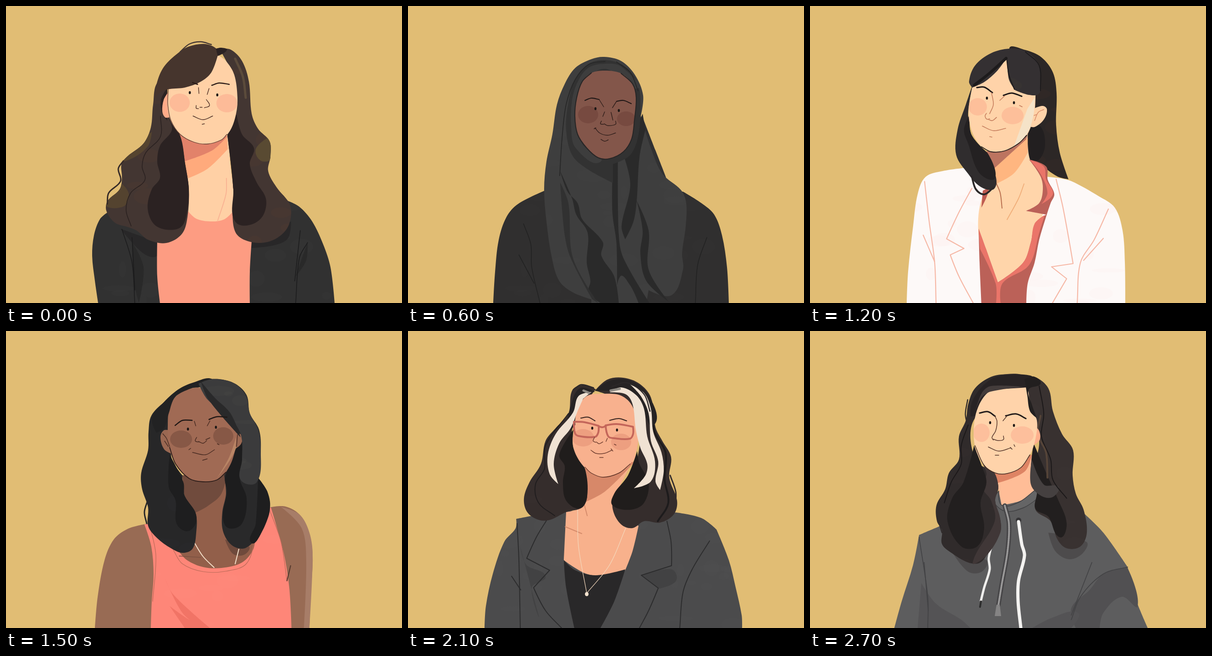
Animation of 864 by 648 pixels, one loop 3000 ms. Source, as an HTML page with a canvas:

```html
<!DOCTYPE html>
<html lang="en">
<head>
<meta charset="utf-8">
<title>Portraits</title>
<style>
html, body { margin: 0; width: 100%; height: 100%; overflow: hidden; background: #e1bd74; }
canvas { display: block; width: 100%; height: 100%; }
</style>
</head>
<body>
<canvas id="stage" width="864" height="648"></canvas>
<script>
const ctx = document.getElementById('stage').getContext('2d');
const HOLD = 300;

// Smooth curve through "x,y" points; "!" marks a corner.
function curve(text, closed) {
  const pts = text.split(' ').map(t => {
    const [x, y] = t.replace('!', '').split(',').map(Number);
    return { x, y, hard: t.endsWith('!') };
  });
  const n = pts.length;
  const at = i => closed ? pts[(i + n) % n] : pts[Math.max(0, Math.min(n - 1, i))];
  const handle = (i, len) => {
    const p = at(i), a = at(i - 1), b = at(i + 1);
    const k = p.hard ? 0 : len / 3 / (Math.hypot(b.x - a.x, b.y - a.y) || 1);
    return [p.x + (b.x - a.x) * k, p.y + (b.y - a.y) * k];
  };
  const path = new Path2D();
  path.moveTo(pts[0].x, pts[0].y);
  for (let i = 0; i < (closed ? n : n - 1); i++) {
    const p = at(i), q = at(i + 1), len = Math.hypot(q.x - p.x, q.y - p.y);
    path.bezierCurveTo(...handle(i, len), ...handle(i + 1, -len), q.x, q.y);
  }
  return path;
}

function shape(color, text) {
  const path = curve(text, true);
  ctx.fillStyle = color;
  ctx.fill(path);
  return path;
}

function lines(color, width, ...texts) {
  ctx.strokeStyle = color;
  ctx.lineWidth = width;
  for (const t of texts) ctx.stroke(curve(t, false));
}

function oval(color, x, y, rx, ry) {
  ctx.fillStyle = color;
  ctx.beginPath();
  ctx.ellipse(x, y, rx, ry, 0, 0, Math.PI * 2);
  ctx.fill();
}

function inside(path, draw) {
  ctx.save();
  ctx.clip(path);
  draw();
  ctx.restore();
}

function mottled(color, tint, text) {
  let seed = text.length;
  const rnd = () => (seed = seed * 16807 % 2147483647) / 2147483647;
  const path = shape(color, text);
  inside(path, () => {
    ctx.globalAlpha = 0.05;
    for (let i = 0; i < 70; i++) {
      oval(tint, 160 + rnd() * 570, 80 + rnd() * 570, 8 + rnd() * 30, 4 + rnd() * 14);
    }
  });
  return path;
}

function face(skin, blush, text, ...cheeks) {
  const path = shape(skin, text);
  inside(path, () => cheeks.forEach(c => oval(blush, ...c)));
  return path;
}

function eyes(x1, y1, x2, y2) {
  oval('#1d1816', x1, y1, 2.3, 3.2);
  oval('#1d1816', x2, y2, 2.3, 3.2);
}

function wavyBrunette() {
  mottled('#313131', '#55504e', '201,648! 194,600 188,545 192,500 205,465 222,450! 612,424! 640,438 668,470 692,520 708,570 717,648!');
  shape('#282728', '250,486! 330,515! 330,545 300,540');
  shape('#282728', '536,515! 622,470! 615,507 585,522 536,528!');
  shape('#292929', '275,515! 300,570 290,648! 279,600');
  shape('#292929', '658,515! 655,555 632,590!');
  lines('#1c1c1d', 1.6, '253,487 275,560 281,648', '275,505 278,560 281,620', '658,516 640,550 632,648', '642,490 630,600');
  shape('#fd9c82', '330,512! 395,440! 493,440! 536,512! 532,580 532,648! 336,648! 330,590');
  shape('#ffd0a5', '374,270! 484,265! 490,350 496,400 494,450! 475,466 446,470 415,464 395,445! 399,400');
  shape('#ffaa7c', '388,338! 397,376! 440,355 484,312! 482,280!');
  shape('#e2826a', '376,278! 389,339! 450,315 483,284!');
  lines('#f9b192', 1.8, '481,376 480,410 462,468');
  const left = mottled('#433632', '#8a4f35', '352,180! 356,240 380,285 391,345 399,400 396,460 384,497 350,517 310,510 285,490 265,482 238,473 219,447 222,425 248,400 253,375 252,345 265,328 300,300 316,265 321,215 332,165');
  const right = mottled('#433632', '#8a4f35', '466,94! 490,95 515,120 530,165 536,235 550,268 575,295 577,328 572,360 590,395 620,435 618,475 600,500 570,515 535,515 505,500 495,470 496,400 482,275! 500,240 503,190 490,140');
  inside(left, () => {
    shape('#55442f', '318,275! 309,307 262,338 240,330');
    shape('#54432f', '250,385! 268,410 255,438 215,430');
  });
  inside(right, () => shape('#594a32', '575,285! 583,330 557,338 545,312'));
  shape('#2b2222', '352,240! 380,283 391,345 399,400 395,450 382,482 350,488 322,475 309,440 318,400 336,375 330,340 336,305 362,270');
  shape('#2b2222', '482,274! 503,236! 515,280 541,310 532,345 547,385 567,420 562,455 540,475 508,477 494,455 496,400');
  lines('#2a2120', 1.6, '337,240 337,285 305,320 297,350 303,380 272,408 262,445 273,480');
  lines('#352a27', 3, '256,338 245,355 250,382 224,408 221,432');
  shape('#2b2423', '352,178! 338,205 341,235 352,250!');
  shape('#ffab88', '354,188! 344,205 341,230 347,243 356,243!');
  face('#ffd1a6', '#fdbb98', '355,178! 352,215 359,250 380,280 410,297 440,301 470,292 490,270 502,235 505,200 498,150 480,120 462,107! 380,165', [379, 211, 22, 20], [482, 212, 23, 20]);
  lines('#5d3b30', 1.3, '354,182 353,215 360,250 380,280 410,297 440,301 470,292 482,280');
  mottled('#46352d', '#a05a35', '462,108! 460,94 435,83 400,88 375,103 345,132 330,165 325,200! 340,186 358,181 390,178 425,165 448,145');
  shape('#2b2222', '458,93! 470,91 482,96 462,109!');
  lines('#433632', 2.5, '380,100 400,83 425,78 448,84');
  lines('#5b4b3b', 5, '500,115 517,155 523,200');
  lines('#2e1f1a', 2.4, '407,167 418,171', '449,173 465,168 487,171');
  lines('#4b2c23', 1.4, '420,178 421,191', '443,180 439,193', '415,217 415,223 420,224', '423,221 428,221', '433,222 444,217 437,204', '408,240 430,248 451,240', '428,258 433,257');
  eyes(401, 189, 461, 194);
}

function headscarf() {
  mottled('#302f2f', '#433c3a', '186,648! 190,580 198,510 215,460 240,432 300,402! 600,405! 640,430 668,455 685,500 696,570 700,648!');
  lines('#222', 1.6, '252,475 268,520 270,570 288,648', '242,543 275,605', '652,505 632,565 627,648');
  shape('#313132', '510,238! 540,315 563,374! 530,400!');
  mottled('#3e3e3e', '#555', '428,111 400,116 365,135 342,170 325,215 315,280 302,340 297,400 302,470 314,550 330,600 360,625 400,640! 400,648! 520,648! 525,620! 575,631 600,575 598,540 606,480 607,430 596,402 555,366 530,310 508,240! 513,195 495,150 465,120');
  const dark = '#2a2a2a';
  shape(dark, '332,360! 358,420 367,455 392,495 390,560 398,600 394,625 420,648! 460,648! 450,590 422,545 425,515 380,465 370,430 348,405');
  shape('#313131', '332,385! 342,500 355,550 402,640! 415,648! 360,550 350,430');
  shape(dark, '447,330! 446,450 455,520 456,648! 463,590 485,610 503,648! 527,648! 470,550 460,500 458,325!');
  shape(dark, '470,325! 485,390 466,480 474,509! 492,470 499,425 505,330 518,270! 512,235!');
  shape(dark, '499,425! 512,490 507,540 520,600 570,646! 525,575 525,490');
  shape('#323232', '430,118 395,126 365,160 350,210 345,270 358,325 390,355 447,386! 447,345! 485,325 503,280 507,210 500,165 470,130');
  shape('#3d3d3d', '430,126 395,134 372,162 358,205 356,265 366,310 420,340 380,300 370,230 385,170 430,137 500,180 465,132');
  lines('#272727', 1.8, '430,121 395,127 365,160 345,215 336,290 331,370', '455,122 485,145 502,185');
  face('#83564a', '#774a40', '430,141 400,146 380,165 368,200 364,240 370,280 390,310 415,331 440,333 470,318 488,290 494,250 498,200 490,170 465,147', [393, 237, 22, 19], [476, 246, 20, 16]);
  lines('#282626', 2.2, '400,146 380,165 368,200 364,240 370,280 390,310 415,331 440,333 470,318 488,290 494,250 498,200 490,170 465,147');
  lines('#1f1716', 2.2, '386,206 400,201 417,204', '455,208 470,206 487,213');
  lines('#2f1e1a', 1.4, '417,204 427,220', '455,208 446,222', '429,231 425,241', '443,232 447,249', '422,251 420,257 427,258', '428,257 436,261 453,258 453,251', '406,268 410,266', '408,266 418,277 435,282 453,277', '421,291 429,295 437,292');
  eyes(409, 224, 460, 228);
}

function whiteBlazer() {
  mottled('#fdf9f8', '#f3b9b9', '211,648! 214,580 225,480 235,410 252,373 290,360 340,353! 540,375! 570,382 630,415 665,440 682,490 687,560 688,648!');
  lines('#f6b8a6', 2.2, '250,383 260,470 272,560 275,648', '247,500 272,558', '353,398 325,450 298,508! 336,529! 306,543! 325,590 356,648', '537,378 552,440 574,562! 527,569! 560,595! 529,648', '651,443 620,510 590,560 583,648', '640,507 597,555');
  mottled('#2c2726', '#6f4430', '435,93 470,96 505,112 530,145 538,190 537,260 545,320 564,378! 540,372 500,345 470,330!');
  shape('#221f20', '478,270! 500,260 513,300 500,335 478,337!');
  shape('#ffd5aa', '385,305! 475,275! 480,335 505,360 512,420 492,520 460,575 410,605! 380,545 367,490 375,420 405,380');
  shape('#bc7460', '384,318! 474,283! 458,322 406,362!');
  shape('#ffb680', '400,356! 406,388! 445,365 475,320! 475,288!');
  shape('#bb6158', '368,486! 384,530 410,603! 465,560 482,515 490,480 515,455! 471,447! 500,430 508,400 503,372 478,335! 515,350 519,380 533,410 525,430 515,460 500,510 490,560 475,605 472,648! 374,648! 370,560');
  shape('#ea7569', '368,486! 384,530 410,603! 465,560 482,515 490,475 512,456! 500,495 478,565 420,605 416,648! 406,648! 405,605 371,530!');
  shape('#ea7569', '480,336! 510,350 515,378 530,410 505,432! 518,408 504,368');
  shape('#bf5b50', '377,403! 390,400 374,440!');
  lines('#b9704f', 2, '406,386 415,408 419,441');
  lines('#f0ad78', 1.8, '467,388 455,420 430,466');
  shape('#302d2e', '357,165! 340,215 322,270 319,325 345,366 370,393 398,401 407,385 400,355 386,320! 360,300 345,240');
  shape('#242122', '349,235! 352,280 387,320! 404,375 370,365 345,300 336,270');
  lines('#2c2828', 4, '353,372 362,400 380,411 400,396');
  shape('#ffd3a9', '488,224! 508,218 517,226 510,248 490,264 477,262!');
  lines('#d98b68', 1.4, '510,226 498,232 490,250', '494,237 485,240');
  face('#ffd3a9', '#fdbf9a', '354,178! 385,155 430,112! 447,165 492,190! 490,230 477,275 455,300 425,316 395,318 370,303 352,270 346,230', [366, 220, 20, 19], [442, 239, 24, 19]);
  shape('#f5e3c8', '490,200! 488,236 474,278 445,307! 474,225!');
  lines('#282221', 1.8, '374,307 395,318 425,316 455,300 473,282');
  mottled('#343032', '#7b5c49', '430,112! 408,142 380,166 354,178! 347,165 360,130 395,103 435,93 470,98 498,125 502,165 500,191 478,194 448,184! 434,160');
  lines('#1d1b1c', 6, '358,173 390,148 428,114');
  lines('#1d1b1c', 2, '429,114 434,150 446,182', '470,100 500,130 503,185');
  lines('#1d1818', 3, '364,178 380,177 398,189', '422,195 440,190 462,197');
  lines('#c47c5c', 1.6, '396,189 400,215 392,235', '414,206 425,196', '385,234 382,240 386,247 392,246', '390,248 398,250 407,243', '376,262 400,272 427,267', '392,285 397,286', '457,217 463,220');
  eyes(386, 201, 445, 211);
}

function coralTank() {
  shape('#986b54', '194,648! 200,580 215,500 235,455 265,432 300,422! 580,384! 610,383 640,400 660,435 669,490 665,570 662,648!');
  shape('#a77d68', '600,384! 640,400 662,440 669,490 662,648! 650,648! 655,500 645,430');
  mottled('#fe8678', '#ff9f91', '302,422! 317,470 322,530 318,590 316,648! 623,648! 618,560 605,480 578,385!');
  shape('#f17466', '347,540! 365,575 445,648! 425,648! 385,615');
  shape('#f17466', '357,600! 390,648! 440,648! 400,630');
  shape('#925f4a', '385,300! 490,300! 485,400 543,440! 540,475 515,505 470,517 430,515 395,500 375,478! 410,420');
  shape('#704b3d', '385,315! 485,300! 470,355 440,382 412,397! 390,360');
  shape('#6f4a3c', '478,455! 530,470 520,488 495,486');
  lines('#b96a58', 1.2, '365,478 385,508 430,525 480,524 525,507 545,445', '314,425 327,490 320,590', '575,390 600,460 613,545');
  lines('#573b30', 2.2, '621,512 613,545');
  lines('#7b5141', 1.6, '378,491 425,494');
  lines('#f3dfc9', 2, '411,462 430,492 454,516', '508,476 500,508');
  mottled('#272728', '#48494b', '385,125! 345,155 317,185 311,220 310,260 295,310 297,345 310,385 310,425 330,452 360,474 385,484 407,475 415,440 414,400 388,355 385,315! 360,270');
  shape('#29292a', '430,106! 465,105 500,115 525,140 532,180 552,215 556,260 549,320 570,350 575,395 555,440 535,465 515,475 490,465 473,435 472,395 480,355 476,315! 505,240');
  shape('#1e1e1f', '357,270! 387,330 390,360 413,395 414,420 395,437 372,420 370,370 355,340');
  shape('#1d1d1e', '511,235! 522,270 510,320 525,365 515,420 485,430 473,405 482,350 478,320');
  shape('#1e1e1f', '550,320! 570,350 576,385 560,435 535,462 545,420');
  lines('#272728', 3, '309,370 302,395 307,420');
  shape('#9a6852', '357,217! 344,217 337,232 345,258 362,268!');
  shape('#9a6852', '502,222! 515,228 513,246 502,256!');
  face('#a06a54', '#875846', '405,125 375,135 357,165 353,205 355,250 370,290 400,322 430,329 460,325 485,300 500,260 505,220 485,182 450,155 425,125', [382, 236, 24, 19], [474, 229, 22, 19]);
  shape('#b98565', '502,232! 498,265 460,322! 487,275');
  lines('#2a1b18', 1.8, '357,254 370,290 400,322 430,329 460,325 480,308');
  lines('#4b2e25', 1.5, '342,224 350,234 357,252', '346,240 354,252', '505,226 503,252');
  shape('#222223', '408,124! 430,122! 450,105 410,112 375,128 340,160 318,190 328,222! 345,212 355,180 370,143');
  mottled('#3b3b3c', '#7a7069', '420,115! 440,150 485,185 512,225 515,280 512,325 547,330 556,262 550,215 532,180 523,140 495,113 450,105');
  shape('#29292a', '425,110! 442,150 512,232! 490,180 455,145');
  lines('#1f1715', 2.4, '369,206 385,195 406,195', '443,193 460,187 482,188');
  lines('#452920', 1.4, '411,197 414,207', '445,196 439,207', '416,232 413,240 420,242', '420,241 430,245 438,239', '436,237 445,233', '407,265 435,270 455,259', '429,282 439,279', '399,259 403,256', '461,246 465,248');
  eyes(397, 214, 458, 210);
}

function vestMan() {
  shape('#fdfdfd', '163,648! 165,590 175,530 200,470 230,424! 645,404! 680,455 705,520 714,590 715,648!');
  shape('#e7e6e5', '208,530! 235,580 238,648! 215,648!');
  shape('#e7e6e5', '685,508! 665,550 658,600');
  mottled('#676767', '#505050', '238,648! 236,570 225,485 230,422! 290,400 345,376! 378,330! 478,336! 520,377! 580,382 645,403! 658,470 662,560 656,648!');
  shape('#585858', '308,500! 447,562! 450,648! 440,590 420,565 345,542 315,525');
  shape('#585858', '583,468! 560,515 500,530 455,600 450,560!');
  const edge = '#3e3e3e';
  lines(edge, 1.2, '247,470 256,590 265,648', '275,462 285,540 304,648', '330,507 343,648', '543,493 540,648', '596,445 585,540 587,648', '625,447 622,550 632,648');
  lines(edge, 2.4, '226,473 270,459 313,444', '570,434 655,449');
  shape('#fbfbfb', '378,352! 361,400 364,440 385,490 420,530 447,562! 480,530 510,490 515,440 500,390 477,352!');
  shape('#ffd0a2', '368,255! 475,330! 479,400 472,440 457,490! 425,465 390,420 376,378');
  shape('#c67e66', '368,265! 385,310 430,347 475,338! 376,379!');
  shape('#ffba89', '376,379! 475,340! 474,350 384,392! 384,412!');
  shape('#e1e0df', '372,462! 385,490! 392,466 412,458 446,490! 405,480 400,510');
  shape('#e1e0df', '459,489! 462,462 480,455 500,470! 515,445! 510,475 490,480');
  lines('#aaa49f', 1.3, '374,463 387,494! 388,465 400,455 447,490', '457,490 462,460 480,456 497,472! 514,445', '455,490 457,540');
  lines(edge, 2.4, '378,331 352,355 330,410 299,496! 355,510 405,530 447,562! 450,648', '478,337 510,365 545,420 585,466! 540,488 490,520 450,562');
  lines(edge, 1.4, '380,340 358,362 335,420 309,489! 360,503 412,525', '482,345 508,372 575,464! 535,482', '305,497 425,552 440,590 443,648');
  shape('#ffd0a7', '362,213! 343,215 339,235 351,263 371,268!');
  lines('#704435', 1.6, '360,214 343,215 339,235 351,263 369,268', '345,224 357,235 362,250');
  const head = face('#ffd2a7', '#fbc5a0', '390,130! 480,135! 495,175 503,225 500,290 485,325 455,345 430,346 400,325 375,285 365,240 364,190', [428, 243, 25, 18], [487, 243, 20, 18]);
  inside(head, () => {
    shape('#f3cda1', '362,200! 372,260 412,310! 375,310!');
    shape('#dfc194', '368,257! 385,290 412,307! 410,283 420,268 440,264 465,266 473,285 471,309! 498,262! 505,275 500,330 445,365 385,325');
    shape('#f8cba2', '418,286! 428,277 445,280 462,277 466,288 440,307');
  });
  lines('#6b4234', 1.5, '369,268 375,285 400,325 430,346 455,345 475,337', '502,215 500,290 485,325 470,340', '370,268 381,320 383,355');
  shape('#62513a', '352,200! 364,228! 364,190 380,155!');
  shape('#62513a', '476,137! 502,215! 518,182 515,140');
  mottled('#8c7b5f', '#b4a789', '395,133! 382,118 362,115 344,130 338,155 335,195 350,217! 363,190 372,160 388,148 400,137 432,153 455,148 485,140 500,160 507,202! 519,175 517,140 497,120 488,100 465,86 440,85 415,95 398,97 385,112');
  lines('#ab9e84', 6, '343,185 360,160 380,143', '448,132 475,128 508,140');
  lines('#4d3e2b', 1.5, '340,178 357,156 395,135', '345,147 365,126 400,133', '385,112 400,133', '402,113 430,112 455,97 480,100', '410,139 450,125 485,120 507,137');
  lines('#7d604a', 1.5, '391,206 405,201 427,206');
  lines('#4c3026', 1.5, '454,228 453,212 465,200 489,199', '456,246 462,255 456,265 439,262', '434,252 433,260 440,262', '410,273 412,269', '423,285 432,291 448,293 461,288');
  eyes(414, 222, 468, 219);
}

function glasses() {
  mottled('#4b4b4c', '#606062', '167,648! 170,600 185,530 210,460 235,430 236,410! 300,398 350,392! 500,400! 585,396! 640,408 673,433! 700,500 715,560 728,620 729,648!');
  shape('#424243', '245,470! 258,510 300,535 270,560 285,620');
  shape('#424243', '510,533! 575,520 585,545 548,562!');
  lines('#2c2c2d', 2, '303,412 280,450 259,496! 309,522! 274,560! 300,610 335,648', '565,415 574,460 575,512! 509,533! 546,561! 525,610 505,648', '238,420 242,500 245,648', '658,458 620,520 600,570 593,648', '226,535 246,565');
  shape('#f8b18c', '385,290! 500,270! 460,345 455,390 503,425! 490,480 474,522! 440,533 390,530 340,500! 345,395! 380,380');
  shape('#d78869', '385,300! 495,285! 430,350 385,374!');
  shape('#292829', '340,500! 365,522 410,533 474,520! 450,590 420,648! 363,648! 345,560');
  lines('#d58b6b', 2, '343,427 379,442', '385,380 391,403');
  lines('#f4d9bd', 1.2, '370,390 372,470 390,572', '475,430 440,510 390,572');
  oval('#f4e3cf', 390, 574, 4, 4.5);
  mottled('#352d2c', '#584139', '410,127! 380,118 358,130 350,180 322,212 300,240 290,290 265,330 253,365 260,395 285,412 310,412 345,395 380,385 391,360 386,305! 360,270 362,200');
  shape('#352d2c', '408,130! 435,106 470,102 505,115 530,145 540,210 555,240 574,275 570,320 587,370 580,400 550,418 515,415 490,430 465,422 447,390 450,355 475,325 500,280! 500,180');
  shape('#201d1c', '361,215! 361,255 386,300 391,360 375,387 345,370 338,330 342,295 330,270');
  shape('#201d1c', '500,262! 505,290 525,330 515,375 485,390 446,380 450,355 480,315');
  lines('#201d1e', 2, '350,180 300,250 298,300 278,335 285,375 320,403');
  lines('#1d1b1c', 4, '533,160 538,220 562,265 560,325 568,375 545,415');
  lines('#352d2c', 3, '572,315 584,350 584,375');
  face('#f8b18e', '#ed9f80', '425,137 390,142 370,170 363,210 360,250 375,285 400,310 425,319 460,310 485,290 500,255 502,215 490,165 465,141', [382, 233, 24, 19], [465, 242, 22, 18]);
  lines('#5d3226', 1.4, '386,297 400,310 425,319 460,310 485,290');
  const cream = '#f0e2d3';
  shape('#262324', '408,133! 380,140 366,170 365,205! 350,215 355,165 375,125');
  shape(cream, '400,133! 372,142 360,178 322,225 305,270 309,312 328,334! 318,290 330,245 355,212 370,175 382,148!');
  shape('#262324', '408,131! 440,108 485,108 525,140 537,205 505,160 475,135');
  shape(cream, '440,134! 465,123 498,140 515,170 522,230 539,285 530,328 493,343! 518,315 522,290 507,255 497,215 490,160 475,138');
  shape(cream, '485,117! 515,135 530,170 535,220 553,265 558,305 550,347! 540,328 546,285 530,240 525,180 508,142');
  lines('#8d8983', 5, '383,130 395,135', '442,130 462,126');
  lines('#2c2829', 2.5, '361,128 378,117 405,124', '445,121 478,113 515,138 528,175');
  lines('#c4665a', 4, '362,198! 364,222 372,229 408,231 415,222 416,207! 385,199 362,198!', '431,206! 437,230 450,234 484,235 491,225 491,209! 455,203 431,206!', '416,208 424,210 432,207');
  lines('#34221e', 2, '377,190 393,188 408,196', '440,195 460,191 477,196');
  lines('#6c3b2d', 1.4, '407,232 404,240 410,243', '411,242 417,246 425,242', '432,241 435,234', '399,260 410,267 428,267 445,260', '443,257 447,262', '418,276 426,276', '450,247 454,249');
  eyes(402, 212, 456, 216);
}

function zipHoodie() {
  mottled('#5d5d5e', '#666', '184,648! 200,590 225,510 238,445! 285,425! 395,368! 412,349! 490,347! 600,400! 640,440 693,515! 705,570 737,648!');
  shape('#515052', '692,515! 715,600 680,580 640,615 632,648! 580,648! 570,605 610,565 640,530');
  shape('#545355', '243,550! 275,595 330,630 350,648! 235,648!');
  shape('#545355', '485,648! 530,625 585,615 570,648!');
  shape('#4d4b4c', '312,485! 385,500 375,525 345,525');
  shape('#4d4b4c', '520,440! 603,460 595,485 565,498 535,480');
  lines('#434345', 1.8, '238,450 257,580 257,648', '249,505 258,610', '693,515 640,530 590,580 570,630', '615,505 570,620');
  shape('#ffbd97', '402,300! 485,270! 490,347! 460,370 418,380!');
  shape('#de8464', '402,303! 484,270! 468,307 408,332!');
  shape('#656566', '395,370! 412,349! 418,380 455,374 490,347! 498,365 450,390 425,393');
  lines('#414143', 1.5, '395,370 425,393 465,386 498,365', '395,370! 412,349! 418,380 455,374 490,348');
  const zip = '425,381 434,420 431,480 418,555 411,598';
  lines('#464547', 10, zip);
  ctx.setLineDash([2, 2]);
  lines('#9a9999', 4, zip);
  ctx.setLineDash([]);
  shape('#858484', '407,597! 414,597! 417,622! 403,622!');
  lines('#f0efed', 5, '400,455 390,495 392,520 380,560 373,588');
  lines('#2c2c2c', 4, '373,590 371,602');
  oval('#363537', 455, 413, 6, 6);
  lines('#f4f3f1', 7, '455,416 462,465 468,490 455,545 454,590 460,648');
  mottled('#302b2b', '#4b4848', '478,105! 460,95 430,94 395,100 360,125 345,160 340,195 325,230 325,280 303,310 295,345 276,380 277,415 288,435 288,465 310,485 345,505 370,506 388,485 415,440 415,410 404,370 411,340 400,305! 360,280 360,190');
  mottled('#383130', '#4b4848', '465,103! 490,100 520,125 530,175 550,225 574,260 573,315 580,355 597,390 604,440 590,470 560,474 540,455 525,415 492,390 495,350 482,310! 500,240');
  shape('#403737', '362,265! 385,310 375,340 395,370 403,415 355,505 385,490 415,440 414,405 404,370 411,340 400,305');
  shape('#221f1f', '358,250! 375,295 385,330 372,375 380,430 365,470 330,470 300,415 310,365 335,330');
  shape('#221f1f', '488,245! 520,320 540,365 560,420 545,450 520,405 492,388 495,350 482,310');
  shape('#454040', '484,280! 510,335 542,340 530,362 505,360 482,335');
  lines('#1b1819', 2, '500,120 510,180 505,230 525,280 530,325 560,365', '345,205 330,250 330,290 308,330 293,375');
  lines('#554438', 4, '503,185 497,225 515,265 518,320');
  lines('#302b2b', 2.5, '344,150 339,180 342,200', '277,405 288,440');
  shape('#ffb08d', '488,205! 500,218 501,238 486,250!');
  face('#ffd3aa', '#fdbf9c', '470,121 430,124 395,130 375,150 362,180 357,220 362,260 380,293 405,310 430,311 460,298 480,270 492,235 495,195 480,165', [374, 222, 18, 20], [463, 227, 25, 19]);
  lines('#3e2720', 1.5, '360,250 380,293 405,310 430,311 460,298 480,270');
  shape('#282324', '475,123! 425,126 395,127 375,148 360,185! 350,185 358,145 395,105 435,95 480,97 490,107');
  shape('#443c3b', '466,122! 395,120 375,135 361,175! 374,145 395,132');
  shape('#221f1f', '468,105! 490,100 503,115 477,128 484,160 495,190! 480,175 474,140');
  lines('#1f1919', 3, '370,179 388,176 404,186', '427,185 450,181 471,191');
  lines('#54352a', 1.5, '403,185 408,197 405,218 397,232 400,238', '421,196 430,185', '400,236 410,239 422,237 422,229', '389,253 412,262 438,255', '437,254 441,258', '404,271 412,271', '445,248 447,252');
  eyes(393, 200, 445, 206);
}

// Plain sitter with cropped hair.
function sitter(body, cloth, shirt, skin, shade, blush, hair, lift) {
  shape(cloth, body);
  shape(shirt, '372,400! 490,400! 475,480 432,540! 390,480');
  shape(skin, '385,290! 478,290! 482,400 460,440 432,460 402,440 380,400');
  shape(shade, '385,300! 478,290! 455,340 385,372!');
  ctx.save();
  ctx.translate(0, lift);
  shape(hair, '430,99 385,108 350,140 340,190 352,245! 490,245! 520,200 515,150 480,110');
  oval(skin, 355, 230, 14, 22);
  face(skin, blush, '430,130 385,140 362,180 360,230 372,280 405,315 435,320 470,305 492,265 500,215 492,165', [384, 232, 22, 19], [474, 234, 22, 19]);
  shape(hair, '358,200! 375,165 425,148 460,160 500,200! 500,140 430,102 365,130');
  lines('#33211b', 1.6, '430,205 424,238 438,241', '405,265 430,274 454,264', '428,288 436,287');
  lines('#251b19', 2.2, '382,196 397,190 411,195', '447,196 462,191 478,197');
  eyes(400, 211, 460, 212);
  ctx.restore();
}

const cardigan = () => sitter('187,648! 195,560 215,470 260,430 375,395! 490,395! 610,430 665,465 690,560 702,648!',
  '#3a393a', '#fd9c82', '#f8bf95', '#d88a69', '#f3a685', '#2f2928', 0);
const openCollar = () => sitter('190,648! 200,550 225,465 275,425 375,395! 490,395! 620,425 680,465 710,550 728,648!',
  '#323233', '#fbf9f7', '#a06a54', '#704b3d', '#875846', '#252324', 8);
const jacket = () => sitter('166,648! 180,550 205,465 260,420 375,390! 490,390! 630,425 685,465 715,560 730,648!',
  '#4b4b4c', '#fbf9f7', '#ffd0a5', '#de8464', '#fdbf9a', '#43352f', -12);

const scenes = [wavyBrunette, cardigan, headscarf, openCollar, whiteBlazer, coralTank, vestMan, glasses, jacket, zipHoodie];
let shown = -1;
let start;

function tick(now) {
  start ??= now;
  const i = Math.floor((now - start) / HOLD) % scenes.length;
  if (i !== shown) {
    shown = i;
    ctx.fillStyle = '#e1bd74';
    ctx.fillRect(0, 0, 864, 648);
    ctx.lineCap = ctx.lineJoin = 'round';
    scenes[i]();
  }
  requestAnimationFrame(tick);
}
requestAnimationFrame(tick);
</script>
</body>
</html>
```
